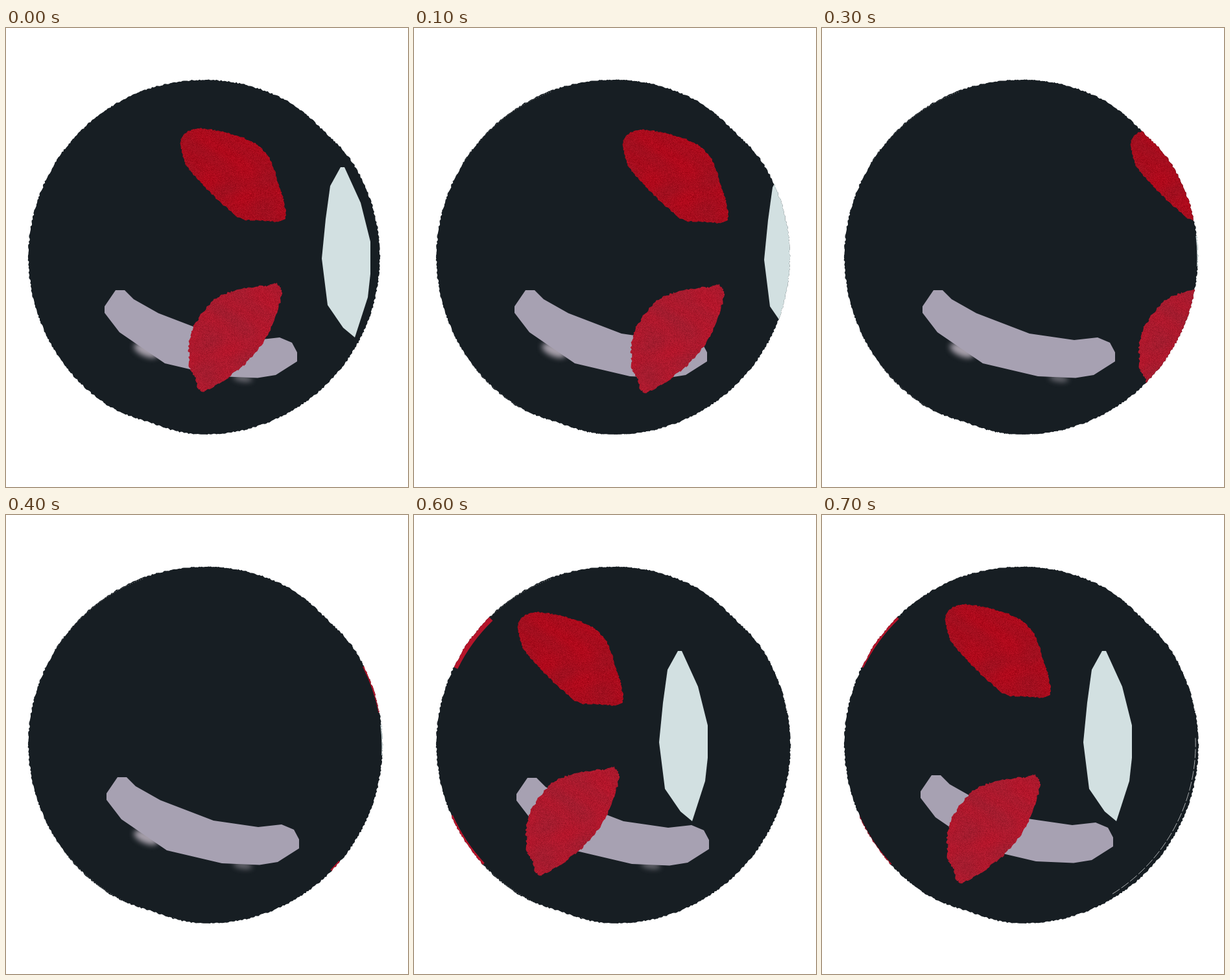
Recreate the animation shown at these times as an HTML page with a canvas. Size 620 by 709 pixels, loop 0.8 s.

```html
<!DOCTYPE html>
<html lang="en">
<head>
<meta charset="utf-8">
<title>Rolling ball</title>
<style>
html, body { margin: 0; width: 100%; height: 100%; overflow: hidden; background: #fff; }
canvas { display: block; }
</style>
</head>
<body>
<canvas id="stage" width="620" height="709"></canvas>
<script>
const W = 620, H = 709, STEP = 100, CX = 305.5, CY = 354, R = 272;
const INK = '#171e23', RED = '#b5142a', PALE = '#d2e0e1', LILAC = '#a7a1b2';
const ctx = document.getElementById('stage').getContext('2d');
const rad = deg => deg * Math.PI / 180;

function seeded(s) {
  return () => {
    s = (s + 0x6d2b79f5) | 0;
    let t = Math.imul(s ^ (s >>> 15), 1 | s);
    t = (t + Math.imul(t ^ (t >>> 7), 61 | t)) ^ t;
    return ((t ^ (t >>> 14)) >>> 0) / 4294967296;
  };
}

// A circle, taller than wide, with two shallow dents and a torn edge.
function makeBall() {
  const path = new Path2D(), rnd = seeded(5);
  const dent = (deg, at, width) => Math.exp(-(((deg - at) / width) ** 2));
  for (let deg = 0; deg < 360; deg += 0.5) {
    const r = R + 0.5 - 1.5 * Math.cos(rad(2 * deg)) - 5 * dent(deg, 108, 9)
      - 4 * dent(deg, 313, 9) + rnd() * 2 - 1;
    path.lineTo(CX + r * Math.cos(rad(deg)), CY + r * Math.sin(rad(deg)));
  }
  path.closePath();
  return path;
}

function polygon(pts) {
  const path = new Path2D();
  for (let i = 0; i < pts.length; i += 2) path.lineTo(pts[i], pts[i + 1]);
  path.closePath();
  return path;
}

// Smooth closed curve through a few points, with a ragged edge.
function leaf(pts, amp, seed) {
  const path = new Path2D(), rnd = seeded(seed), n = pts.length, parts = 14;
  const spline = (a, b, c, d, u) =>
    b + u / 2 * (c - a + u * (2 * a - 5 * b + 4 * c - d + u * (3 * (b - c) + d - a)));
  const coord = (i, axis, u) =>
    spline(...[n - 2, 0, 2, 4].map(k => pts[(i + k + axis) % n]), u);
  for (let i = 0; i < n; i += 2) {
    for (let k = 0; k < parts; k++) {
      const jitter = () => amp * (rnd() * 2 - 1);
      path.lineTo(coord(i, 0, k / parts) + jitter(), coord(i, 1, k / parts) + jitter());
    }
  }
  path.closePath();
  return path;
}

// Red paint with paper grain, prepared once.
function paint(path, base, seed) {
  const c = document.createElement('canvas');
  c.width = W;
  c.height = H;
  const g = c.getContext('2d', { willReadFrequently: true }), rnd = seeded(seed);
  g.fillStyle = RED;
  g.fill(path);
  const img = g.getImageData(0, 0, W, H), d = img.data;
  for (let i = 0; i < d.length; i += 4) {
    if (!d[i + 3]) continue;
    const x = i / 4 % W, y = Math.floor(i / 4 / W);
    const wash = Math.sin(x * 0.07 + 2 * Math.sin(y * 0.05)) * Math.sin(y * 0.06 - x * 0.03 + seed);
    const grain = (rnd() + rnd() - 1) * 20;
    d[i] = base[0] + wash * 8 + grain;
    d[i + 1] = base[1] - wash * 3 + grain * 0.4;
    d[i + 2] = base[2] - wash * 2 + grain * 0.5;
  }
  g.putImageData(img, 0, 0);
  return c;
}

const ball = makeBall();
const shine = polygon([516,215, 522,215, 547,270, 562,330, 562,380, 558,416, 538,478,
  520,463, 496,428, 487,356, 493,295, 500,244]);
const mouth = polygon([169,405, 183,405, 197,419, 235,440.5, 317,472, 386,482, 422,478,
  441,486, 449,501, 449,515, 416,536, 388,540.5, 330,538, 245,518, 175,470, 152,440, 152,430]);
const upper = paint(leaf([270,172, 290,156, 318,157, 345,163, 382,177, 406,201, 421,243,
  429,270, 428,297, 390,297, 360,293, 322,261, 290,227, 275,206], 1, 8), [168, 12, 29], 3);
const lower = paint(leaf([420,396, 424,418, 405,470, 375,512, 345,538, 303,561, 292,540,
  283,522, 283,482, 294,452, 324,418, 355,405, 400,398], 1.6, 9), [172, 25, 45], 4);

// The ball drifts and leaves its earlier places filled.
const drifts = [[0, 0], [3, 0], [4, 3]];
const bodies = drifts.map((_, i) => {
  const p = new Path2D();
  for (const [x, y] of drifts.slice(0, i + 1)) p.addPath(ball, new DOMMatrix([1, 0, 0, 1, x, y]));
  return p;
});

// Paint left on the rim: colour, start and end in degrees, width.
const rightRim = [[PALE, -7, 3, 3], [RED, -27, -11, 3], [RED, 41, 45, 3]];
const leftRim = width => [[RED, 206, 226, width], [RED, 137, 156, width / 2]];

const poses = [
  { drift: 0, eyes: [0, 0], mouth: [0, 0], glows: 2 },
  { drift: 1, eyes: [53, 2], mouth: [3, 0], glows: 2 },
  { drift: 1, eyes: [106, 4], mouth: [3, 0], glows: 2, rims: rightRim.slice(0, 1) },
  { drift: 1, eyes: [207, 2], mouth: [3, 0], glows: 2, rims: rightRim.slice(0, 1) },
  { drift: 2, eyes: [310, 0], mouth: [3, 0], glows: 2, rims: rightRim },
  { drift: 2, eyes: [-234, -3], mouth: [4.5, 3], glows: 2, rims: rightRim.slice(0, 2) },
  { drift: 2, eyes: [-109, -5], mouth: [6, 1], glows: 1, rims: leftRim(8) },
  { drift: 2, eyes: [-84, -5], spread: [5, -12], mouth: [0, -3], glows: 0, rims: leftRim(4), arc: true }
];

function rim(color, from, to, width, [dx, dy], dash = []) {
  ctx.strokeStyle = color;
  ctx.lineWidth = width;
  ctx.setLineDash(dash);
  ctx.beginPath();
  ctx.arc(CX + dx, CY + dy, R + 1 - width / 2, rad(from), rad(to));
  ctx.stroke();
}

function shape(path, color, [x, y] = [0, 0]) {
  ctx.save();
  ctx.translate(x, y);
  ctx.fillStyle = color;
  ctx.fill(path);
  ctx.restore();
}

function glow(x, y, rx, ry, turn, alpha) {
  ctx.save();
  ctx.filter = 'blur(4px)';
  ctx.globalAlpha = alpha;
  ctx.fillStyle = '#b8b0bc';
  ctx.beginPath();
  ctx.ellipse(x, y, rx, ry, turn, 0, 7);
  ctx.fill();
  ctx.restore();
}

function draw({ drift, eyes: [x, y], spread: [sx, sy] = [0, 0], mouth: lip, glows, rims = [], arc }) {
  ctx.fillStyle = '#fff';
  ctx.fillRect(0, 0, W, H);
  shape(bodies[drift], INK);
  ctx.save();
  ctx.clip(bodies[drift]);
  if (drift && !arc) rim('#fff', 100, 250, 0.6, [1, 0], [1, 2.5]);
  for (const r of rims) rim(...r, r[1] > 90 ? drifts[0] : drifts[drift]);
  if (arc) rim('#e8eaea', -2, 58, 0.7, [-2, 0], [14, 3]);
  if (glows) glow(365, 541, 15, 5, 0.15, 0.55);
  if (glows > 1) glow(216, 498, 20, 9, 0.4, 0.9);
  shape(mouth, LILAC, lip);
  shape(shine, PALE, [x, y]);
  ctx.drawImage(upper, x + sx, y + sy);
  ctx.drawImage(lower, x - sx, y - sy);
  ctx.restore();
}

let shown = -1;
function tick(now) {
  const i = Math.floor(now / STEP) % poses.length;
  if (i !== shown) draw(poses[shown = i]);
  requestAnimationFrame(tick);
}
draw(poses[0]);
requestAnimationFrame(tick);
</script>
</body>
</html>
```
